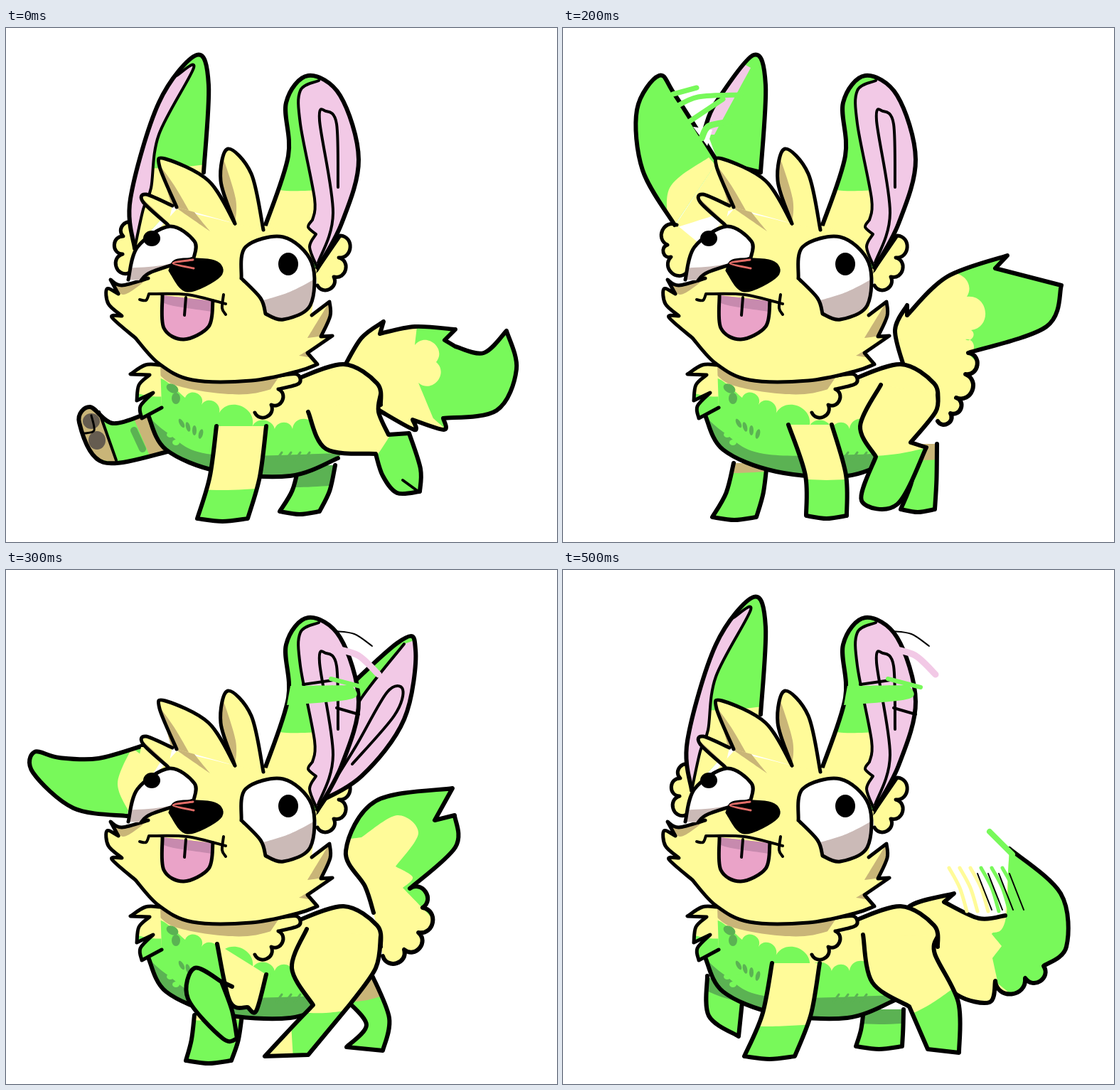
These frames come from a looping animation (775 by 723 pixels, 600 ms). An HTML page with a canvas:

```html
<!DOCTYPE html>
<html lang="en">
<head>
<meta charset="utf-8">
<title>Walk cycle</title>
<style>
html, body { margin: 0; width: 100%; height: 100%; overflow: hidden; background: white; }
canvas { display: block; }
</style>
</head>
<body>
<canvas id="stage" width="775" height="723"></canvas>
<script>
const stage = document.getElementById('stage');
const ctx = stage.getContext('2d');
const yellow = '#fffb99', green = '#78f95a', dark = '#5bb253', tan = '#c9b578';
const pink = '#f2c9e6', grey = '#cbbab7', pad = '#655c50', black = '#000', white = '#fff';
const cache = new Map();

// Smooth curve through "x y" points. A slash makes a corner, "/ ~" starts a row of scallops.
function trace(s) {
  if (cache.has(s)) return cache.get(s);
  const path = new Path2D();
  let last;
  for (const seg of s.split('/')) {
    const n = seg.match(/-?[\d.]+/g).map(Number);
    const pts = last ? [last] : [];
    for (let i = 0; i < n.length; i += 2) pts.push([n[i], n[i + 1]]);
    if (!last) path.moveTo(...pts[0]);
    for (let i = 0; i < pts.length - 1; i++) {
      const b = pts[i], c = pts[i + 1], a = pts[i - 1] || b, d = pts[i + 2] || c;
      if (seg.includes('~')) {
        const dx = (c[0] - b[0]) / 2, dy = (c[1] - b[1]) / 2;
        path.bezierCurveTo(b[0] + dy * 1.3, b[1] - dx * 1.3, c[0] + dy * 1.3, c[1] - dx * 1.3, ...c);
      } else {
        path.bezierCurveTo(b[0] + (c[0] - a[0]) / 6, b[1] + (c[1] - a[1]) / 6,
          c[0] - (d[0] - b[0]) / 6, c[1] - (d[1] - b[1]) / 6, ...c);
      }
    }
    last = pts[pts.length - 1];
  }
  cache.set(s, path);
  return path;
}

function fill(s, color) {
  ctx.fillStyle = color;
  ctx.fill(trace(s));
}

function line(s, width = 4, color = black) {
  ctx.strokeStyle = color;
  ctx.lineWidth = width;
  ctx.stroke(trace(s));
}

function dot(x, y, rx, ry, color, turn = 0) {
  ctx.fillStyle = color;
  ctx.beginPath();
  ctx.ellipse(x, y, rx, ry, turn, 0, 7);
  ctx.fill();
}

// Outlined shape; colour patches are clipped to it.
function part(width, outline, base, ...patches) {
  fill(outline, base);
  ctx.save();
  ctx.clip(trace(outline));
  for (let i = 0; i < patches.length; i += 2) fill(patches[i], patches[i + 1]);
  ctx.restore();
  if (width) line(outline, width);
}

const limb = (...shape) => part(6, ...shape);
const fur = (...shape) => part(5, ...shape);

// Everything on the right-hand side of a slightly sagging line.
function below(x1, y1, x2, y2) {
  const dx = x2 - x1, dy = y2 - y1, k = 200 / Math.hypot(dx, dy);
  const mx = (x1 + x2) / 2 - dy * k / 50, my = (y1 + y2) / 2 + dx * k / 50;
  return `${x1} ${y1} ${mx} ${my} ${x2} ${y2} / ${x2 - dy * k} ${y2 + dx * k} / ${x1 - dy * k} ${y1 + dx * k}`;
}

// Straight leg: top left, top right, top y, foot left, foot right, foot y, sock y.
function leg(l, r, top, fl, fr, foot, sock, base = yellow, bend = .35) {
  const mid = top + (foot - top) * .55;
  const lx = l + (fl - l) * bend, rx = r + (fr - r) * bend;
  limb(`${l} ${top} ${lx} ${mid} ${fl} ${foot} / ${(fl + fr) / 2} ${foot + 4} ${fr} ${foot} / ${rx} ${mid} ${r} ${top}`,
    base, below(fl - 40, sock, fr + 40, sock), green);
}

function tail(outline, edge) {
  limb(outline, yellow, edge + ' / 999 900 / 999 100', green);
}

const belly = '200 545 225 593 300 624 400 630 467 605';
const back = '527 530 522 500 475 473 408 494';

function torso() {
  part(0, `210 475 / ${belly} / ${back} / 300 480`, yellow,
    '180 505 / 215 492 252 520 / ~ 275 530 298 545 345 565 378 571 403 564 435 567 / 490 650 / 180 650', green,
    '180 525 225 568 290 600 470 598 / 470 640 / 180 640', dark,
    '205 474 240 503 340 515 425 489', tan);
  line(belly, 6);
  line(back, 6);
  dot(234, 507, 9, 6, dark, .5);
  dot(239, 521, 6, 8, dark);
  for (let i = 0; i < 4; i++) {
    dot(247 + i * 9, 556 + i * 5, 3, 7, dark, i / 4 - .5);
    dot(231 + i * 8, 572 + i % 2 * 11, 5, 4, green);
    line(`${380 + i * 13} 608 ${388 + i * 13} 597`, 3, dark);
  }
}

function ruff() {
  fur('217 474 196 474 175 487 / 202 488 / 187 502 184 524 / 207 513 / 189 532 191 549 / 219 534', yellow,
    below(170, 510, 240, 518), green);
  fur('385 489 409 487 412 500 383 508 / ~ 373 530 350 541', yellow);
}

function stride() {
  tail('475 478 500 436 531 413 / 526 430 / 575 420 632 424 / 617 439 / 632 448 / 672 457 704 426 / 718 480 690 538 615 549 / 616 565 572 551 / 574 565 525 538',
    '578 420 / 575 446 / ~ 605 470 580 499 / 601 549');
  limb('196 543 150 556 118 533 103 555 137 611 232 595', green,
    '178 545 204 606 / 280 606 / 240 520', tan, '100 530 / 128 536 157 612 / 95 600', tan);
  line('180 566 192 592', 10, dark);
  line('131 540 155 608');
  dot(120, 553, 12, 11, pad);
  dot(128, 580, 12, 13, pad);
  line('120 545 124 566 111 570', 3);
  leg(412, 463, 615, 385, 441, 680, 642, dark);
  torso();
  leg(296, 366, 560, 269, 340, 690, 646);
  limb('425 540 450 592 520 599 / 530 630 550 654 582 652 / 583 620 567 570 / 538 572 / 524 540 527 515', yellow,
    below(480, 655, 570, 524), green);
  line('558 636 580 652');
}

function plant() {
  tail('468 474 500 437 547 417 / 530 437 / 580 420 630 440 668 505 732 543 / 700 592 615 617 550 572 536 530 / 539 565 / 524 552',
    '672 510 645 502 / 631 514 / 620 500 593 523 / 579 564 / 566 545 567 585');
  limb('207 570 180 608 151 609 138 635 / 165 660 203 675 / 250 606', tan,
    below(170, 590, 260, 622), green, below(120, 612, 215, 660), tan);
  line('148 615 175 623 211 660');
  line('181 614 194 628');
  dot(158, 636, 9, 8, pad);
  dot(177, 659, 14, 6, pad, .4);
  leg(447, 475, 606, 434, 487, 682, 654, dark);
  torso();
  leg(295, 363, 560, 341, 398, 688, 634, yellow, .95);
  limb('443 502 430 560 470 611 / 464 655 480 672 512 668 / 533 590 514 562 / 526 515', yellow,
    below(440, 614, 560, 564), green);
}

function cross() {
  tail('480 478 467 425 484 390 / 484 404 / 540 350 625 320 / 608 338 / 701 362 / 680 420 570 457 / ~ 566 487 553 520 545 542 527 553',
    '531 355 / ~ 568 378 574 425 566 438 570 458');
  leg(240, 287, 612, 210, 272, 688, 622, tan);
  leg(495, 526, 585, 475, 523, 677, 604, tan, .2);
  torso();
  leg(317, 378, 558, 342, 399, 686, 632, yellow, .95);
  limb('447 502 418 560 440 603 / 420 665 470 670 511 590 / 489 583 / 524 540 527 515', yellow,
    below(410, 604, 530, 586), green);
}

function lift() {
  tail('517 482 505 445 478 395 520 325 628 307 / 603 352 / 631 345 / 632 390 568 448 / ~ 586 475 580 510 560 534 530 543',
    '500 250 / 470 380 / 500 376 / 550 345 580 370 548 417 / 572 432 558 447');
  leg(265, 332, 626, 253, 317, 690, 630);
  limb('514 568 539 630 530 676 / 479 671 / 507 640 479 605', tan, below(470, 608, 545, 594), green);
  torso();
  limb('297 526 315 607 340 615 / 352 620 366 569', yellow);
  limb('303 579 265 560 256 603 305 659 325 659 / 318 620 303 579 / 318 586', green);
  limb('423 505 402 560 432 612 / 405 640 364 684 / 425 682 / 483 612 / 520 560 527 515', yellow,
    below(400, 622, 500, 616), green);
}

function reach() {
  tail('523 487 535 455 488 405 / 512 412 / 495 340 541 264 / 605 310 626 399 / 646 430 646 465 603 498 / ~ 592 517 573 535 545 546 522 528',
    '480 200 / 510 412 / 517 375 544 382 / 540 335 580 345 602 400 / 628 399');
  leg(298, 370, 636, 297, 368, 680, 650, dark);
  limb('499 603 528 614 545 650 583 663 / 588 640 573 574 / 520 553', tan, below(500, 660, 580, 530), green);
  torso();
  limb('301 533 270 603 257 613 / 262 640 / 208 597 193 625 243 684 / 285 683 / 325 625 345 567', yellow,
    below(190, 570, 350, 650), green, '190 600 / 216 604 264 684 / 180 700', tan);
  line('216 604 242 638 264 683');
  dot(205, 621, 6, 11, pad, -.3);
  dot(221, 624, 6, 15, pad, -.3);
  dot(232, 661, 18, 15, pad, .6);
  limb('423 495 405 565 455 627 / 444 685 / 505 683 / 515 625 503 608 / 500 575 527 515', yellow,
    below(430, 634, 530, 616), green);
}

function push() {
  tail('628 392 700 455 708 530 676 557 / ~ 650 574 608 578 / 600 608 555 598 525 560 / 490 520 / 485 475 550 455 / 536 467 / 585 490 622 486',
    '620 200 / 625 470 603 512 / 617 529 / 604 546 / 612 582');
  line('600 368 632 400', 8, green);
  for (let x = 543; x < 620; x += 15) {
    line(`${x} 419 ${x + 15} 447 ${x + 25} 480`, 5, x < 575 ? yellow : green);
    if (x > 570) line(`${x + 10} 427 ${x + 30} 478`, 2);
  }
  limb('203 571 205 627 247 656 / 252 608', dark, below(180, 582, 270, 612), green);
  leg(423, 479, 618, 412, 477, 670, 635, dark);
  torso();
  leg(294, 361, 553, 255, 326, 684, 638);
  limb('422 513 435 580 487 614 / 513 674 / 557 679 / 556 608 523 540 527 515', yellow,
    below(470, 634, 560, 580), green);
}

function leftUp() {
  const edge = '240 67 264 56 215 150 204 225 193 255 181 310';
  fur('195 330 / 172 345 / ~ 164 318 165 293 181 276', yellow);
  limb('181 310 175 240 215 105 268 38 285 80 278 203', green,
    below(150, 196, 300, 190), yellow, edge + ' / 100 200', pink);
  line(edge);
}

function leftSwing() {
  fill('217 188 / 240 255 / 155 282', yellow);
  fur('200 310 / 174 344 / ~ 152 322 147 305 160 277', yellow);
  limb('200 140 215 105 268 38 285 80 278 203 / 218 188', green, '264 56 213 150 / 180 150 / 235 40', pink);
  limb('157 277 112 200 104 115 135 67 158 95 217 188', green, '150 290 150 225 205 182 / 300 290', yellow);
  fill('183 139 / 210 143 / 203 166', white);
  line('155 93 188 84', 7, green);
  line('155 113 190 97 250 94', 7, green);
  line('177 132 225 100', 7, green);
  line('195 155 205 138 235 132', 9, green);
}

function leftLow() {
  limb('196 246 130 265 75 264 40 256 38 285 95 335 170 346', green, '177 250 157 300 174 342 / 230 290', yellow);
  fill('190 249 / 230 250 / 172 342', yellow);
}

function leftDown() {
  fill('205 195 / 235 250 / 180 290 / 160 240', yellow);
  limb('217 197 170 187 110 235 33 272 85 300 185 290', green, '149 200 145 235 184 289 / 250 200', yellow);
  line('153 312 172 306');
}

function rightUp() {
  const edge = '440 74 414 88 414 135 434 240 431 270 / 425 280 436 290 / 427 308 437 335';
  limb('364 280 397 180 394 105 425 67 470 95 496 185 472 275 437 340', green,
    below(350, 222, 440, 228), yellow, edge + ' / 560 300 / 520 40', pink);
  line(edge);
  line('439 330 460 260 441 130 450 117 465 135 467 224');
}

function rightOut() {
  const edge = '560 104 500 180 465 245 435 268 / 416 275 434 282 / 425 305 430 328';
  limb('362 284 420 225 550 103 576 112 560 210 500 290 432 330', yellow,
    below(475, 255, 410, 170), green, edge + ' / 600 340 / 600 90', pink);
  line(edge);
  line('487 273 546 205 558 168 536 172 492 248 449 317');
}

function rightSmear() {
  fill('400 163 487 162 / 487 181 395 190', green);
  line('418 161 460 155');
  line('457 153 503 165', 6, green);
  line('460 110 495 120 524 147', 9, pink);
  line('463 86 490 90 515 107', 2);
  line('465 194 496 203');
}

function rightTuft() {
  fur('435 343 / 470 292 / ~ 468 323 461 350 438 362', yellow);
}

const jaw = '200 352 163 362 147 354 / 158 374 / 142 367 144 388 163 405 / 149 407 182 436 / 215 472 262 495 345 496 410 483 438 473 / 424 457 / 459 433 / 443 434 / 456 405 455 385 / 430 404';

function hair() {
  fill('217 192 262 255 287 286 / 232 248', tan);
  fur('240 252 216 195 224 184 285 215 322 275', yellow, '214 190 237 222 262 265 / 205 240', tan);
  fur('322 275 302 215 312 170 345 205 362 284', yellow, '304 178 323 240 322 276 / 280 230', tan);
  fur('228 277 193 245 197 234 234 250', yellow, '192 240 230 275 / 190 280', tan);
}

function eyes() {
  fur('172 354 185 308 230 279 265 300 264 324 / 205 343 190 355', white, below(165, 338, 270, 322), grey);
  dot(205, 296, 12, 11, black);
  fur('331 352 337 308 390 294 430 330 428 390 390 410 365 402 / 358 380 331 352', white, below(355, 385, 440, 350), grey);
  dot(397, 332, 14, 16, black);
}

function muzzle() {
  fur('220 376 222 422 250 438 285 420 291 384', '#eaa3c8', '215 370 / 225 388 290 399 / 300 370', '#c78aae');
  line('253 379 251 404');
  line('188 382 197 383 201 374 / 255 375 309 388');
  line('306 375 304 394 309 403');
  fur('231 341 242 327 293 329 300 348 255 369 231 341', black);
  line('263 326 235 331 264 338', 3, '#e26c67');
}

function head() {
  part(0, jaw + ' / 437 340 / 385 285 322 275 / 240 255 / 172 330', yellow,
    '455 385 424 436 / 470 430', tan, '459 433 412 461 / 440 465', tan, '147 354 165 375 198 354', tan);
  line(jaw, 5);
  hair();
  eyes();
  muzzle();
}

const steps = [
  [stride, leftUp, rightTuft, rightUp],
  [plant, leftUp, rightTuft, rightUp],
  [cross, leftSwing, rightTuft, rightUp],
  [lift, leftLow, rightTuft, rightOut, rightUp, rightSmear],
  [reach, leftDown, rightTuft, rightOut],
  [push, leftUp, rightTuft, rightUp, rightSmear]
];

function draw([pose, ...ears]) {
  ctx.fillStyle = white;
  ctx.fillRect(0, 0, stage.width, stage.height);
  pose();
  ruff();
  ears.forEach(ear => ear());
  head();
}

ctx.lineCap = ctx.lineJoin = 'round';
const start = performance.now();
let shown;

function tick() {
  const step = steps[Math.floor((performance.now() - start) / 100) % steps.length];
  if (step !== shown) draw(shown = step);
  requestAnimationFrame(tick);
}
tick();
</script>
</body>
</html>
```
